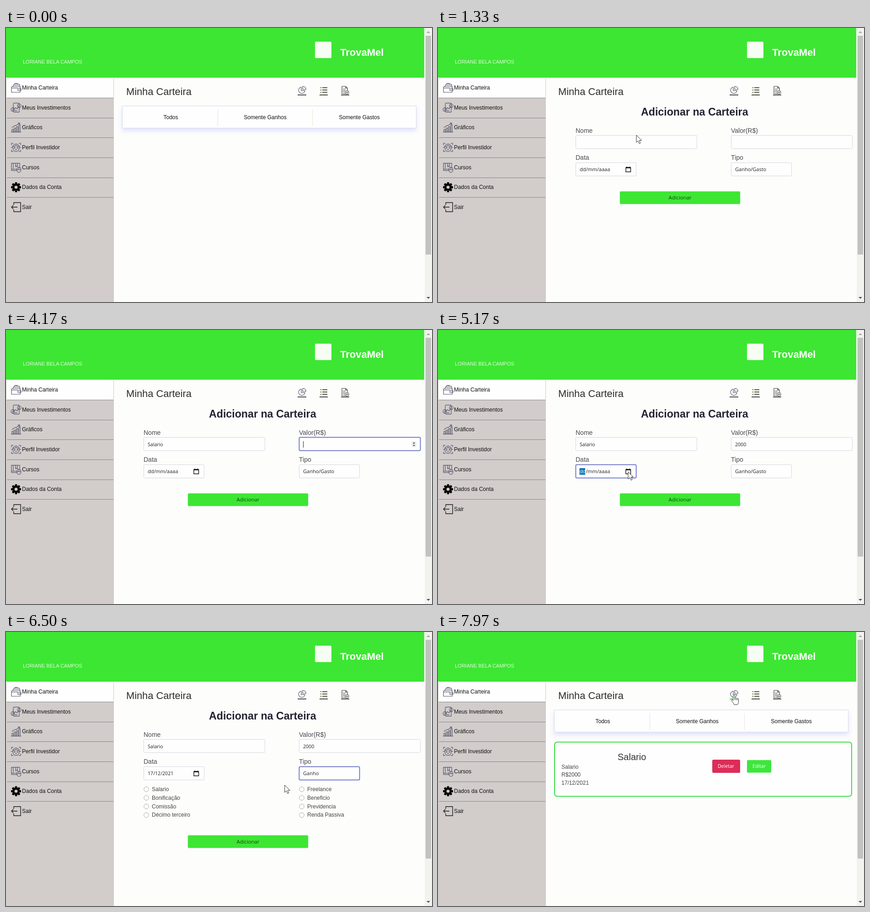
Animation, 932 px wide and 601 px high, one loop 8000 ms. Source, as an HTML page:

```html
<!DOCTYPE html>
<html lang="pt-BR">
<head>
<meta charset="utf-8">
<title>Minha Carteira</title>
<style>
html, body { margin: 0; width: 100%; height: 100%; overflow: hidden; background: #fdfdfc; }
svg { display: block; width: 100%; height: 100%; }
text { font: 12px "Liberation Sans", Arial, sans-serif; fill: #111; white-space: pre; }
.ui { font-family: "Open Sans", "Noto Sans", sans-serif; font-size: 11px; fill: #222; }
.small { font-size: 10.6px; }
.label { font-size: 14px; fill: #484850; }
.soft { fill: #444; }
.mid { text-anchor: middle; }
.icon { fill: none; stroke: #55556a; stroke-width: 1.2; stroke-linejoin: round; }
.box { fill: #fefefe; stroke: #d6d6e0; }
</style>
</head>
<body>
<svg id="stage" viewBox="0 0 932 601" preserveAspectRatio="none"></svg>
<script>
const LOOP = 8000;
const GREEN = '#3de633';
const SIDE = '#d2cccb';
const stage = document.getElementById('stage');
const $ = id => document.getElementById(id);

const rect = (x, y, w, h, attrs = '') =>
  `<rect x="${x}" y="${y}" width="${w}" height="${h}" ${attrs}/>`;
const text = (x, y, str, cls = '', attrs = '') =>
  `<text x="${x}" y="${y}" class="${cls}" ${attrs}>${str}</text>`;
const path = (d, attrs = '') => `<path d="${d}" ${attrs}/>`;
const group = (id, body, attrs = '') => `<g id="${id}" ${attrs}>${body}</g>`;
const input = (id, x, y, w) => rect(x + .5, y + .5, w, 29, `id="${id}" class="box" rx="2"`);

// Sidebar icons, each inside a 22 x 22 box
const gear = () => {
  const teeth = [...Array(8).keys()].map(i =>
    rect(8.6, 0, 4.8, 6, `rx="1" transform="rotate(${i * 45} 11 11)"`)).join('');
  return `<g fill="#080808" stroke="none">${teeth}</g>
    <circle cx="11" cy="11" r="5.8" stroke="#080808" stroke-width="5"/>`;
};
const menu = [
  ['Minha Carteira', path('M1 9h19v12H1zM3 9 7 3h11l2 6M5 6h13M7 3l4-2 5 2M15 13h7v4h-7zM1 12h14')],
  ['Meus Investimentos', rect(5, 1, 13, 20, 'rx="2"') +
    path('M6 15l4-4 3 3 5-7M8 18h6') +
    '<circle cx="4" cy="15" r="4"/><circle cx="18" cy="7" r="4"/>' +
    path('M4 13v4M18 5v4')],
  ['Gráficos', path('M2 21v-6h3v6M7 21v-9h3v9M12 21V9h3v12M17 21V5h3v16M0 21h22M2 11l6-4 4-1 7-5M15 1h4v4')],
  ['Perfil Investidor', path('M1 6V2h4M17 2h4v4M1 16v4h4M17 20h4v-4M0 11h4M18 11h4M4 8q7-9 14 0v5q-2 7-7 7t-7-7zM4 9q5 0 7-3 2 3 7 3M9 16h4') +
    '<circle cx="8" cy="12" r="1"/><circle cx="14" cy="12" r="1"/>'],
  ['Cursos', path('M1 2h18v16H1zM5 2v12M1 15h14M10 2v8l2-2 2 2V2') +
    rect(13, 11, 8.5, 11, `rx="4" fill="${SIDE}"`) + path('M13 16h8.5M17.2 11v5')],
  ['Dados da Conta', gear()],
  ['Sair', path('M6 6V1h15v20H6v-5M1 11h13M5 7l-4 4 4 4', 'stroke="#333" stroke-width="1.6"')]
];
const sidebar = menu.map(([label, art], i) => {
  const cy = 131 + i * 43.65;
  const line = i < 6 ? rect(2, Math.round(cy + 22), 233, 1, 'fill="#85858c"') : '';
  return `<g class="icon" transform="translate(11 ${cy - 11})">${art}</g>` +
    text(35, Math.round(cy + 4), label) + line;
}).join('');

const toolbar = `<g class="icon">
  ${path('M646 129.5a7 7 0 1 0 8 8h-8zM649 128v7h7q0-7-7-7')}
  ${path('M692 131h11M692 136h11M692 141h11M688 131h2M688 136h2M688 141h2', 'stroke="#55553e" stroke-width="1.8"')}
  ${path('M745 144h-10v-16h8l4 4v5M743 128v4h4M737 134h6M737 137h5M737 140h4', 'stroke="#44443c"')}
  <circle cx="746" cy="141" r="4" fill="#fdfdfd" stroke="#44443c"/>
  ${path('M744 141h4M746 139v4', 'stroke="#44443c"')}</g>` +
  rect(638, 146, 19, 1.6, 'id="pieLine" fill="#222"') +
  rect(686, 146, 18, 1.6, 'fill="#222"') + rect(733, 146, 18, 1.6, 'fill="#222"');

const tabs = rect(254.5, 171, 643, 48.5, 'fill="#fefefe" stroke="#dadaec" filter="url(#shade)"') +
  rect(463, 178, 1, 37, 'fill="#e2e2ee"') + rect(670, 178, 1, 37, 'fill="#e8e8d8"') +
  [[360.5, 'Todos'], [567, 'Somente Ganhos'], [773, 'Somente Gastos']]
    .map(([x, s]) => text(x, 200, s, 'mid')).join('');

const card = rect(255, 241.5, 650, 119, 'rx="6" fill="#fefefe" stroke="#3ade44" stroke-width="2"') +
  text(393, 281, 'Salario', '', 'style="font-size:20px;fill:#333"') +
  ['Salario', 'R$2000', '17/12/2021'].map((s, i) => text(270, 300 + i * 17.3, s, 'soft')).join('') +
  rect(600, 280, 61, 29, 'rx="3" fill="#dd2c58"') +
  rect(676, 281, 53, 27.5, 'rx="2" fill="#3de63c"') +
  text(630, 298, 'Deletar', 'ui small mid', 'style="fill:#fff"') +
  text(702.5, 298, 'Editar', 'ui small mid', 'style="fill:#fff"');

const kinds = [
  [307, ['Salario', 'Bonificação', 'Comissão', 'Décimo terceiro']],
  [647, ['Freelance', 'Beneficio', 'Previdencia', 'Renda Passiva']]
];
const radios = kinds.map(([x, names]) => names.map((s, i) => {
  const y = 345 + i * 18.8;
  return `<circle cx="${x}" cy="${y}" r="5.3" fill="#fff" stroke="#aaaab0"/>` + text(x + 12, y + 4, s, 'soft');
}).join('')).join('') +
  '<circle id="picked" cx="307" cy="345" r="4.1" fill="#fff" stroke="#1268e8" stroke-width="3.4"/>';

const form = text(444, 192, 'Adicionar na Carteira', '', 'style="font-size:23.2px;font-weight:bold;fill:#222230"') +
  [[301, 230, 'Nome'], [641, 230, 'Valor(R$)'], [301, 289, 'Data'], [641, 289, 'Tipo']]
    .map(([x, y, s]) => text(x, y, s, 'label')).join('') +
  input('name', 301, 235, 265) + input('value', 641, 235, 265) +
  input('date', 301, 295, 132) + input('type', 641, 295, 132) +
  text(310, 255, '', 'ui small', 'id="nameText"') + text(650, 255, '', 'ui small', 'id="valueText"') +
  group('spin', rect(887, 244, 11, 13, 'fill="#eee"') + path('M890 249l2.5-3 2.5 3zM890 252l2.5 3 2.5-3z', 'fill="#444"')) +
  rect(309.5, 303, 12.5, 14.5, 'id="mark" fill="#0b72b8"') +
  text(310, 314, '<tspan id="day"></tspan><tspan id="rest"></tspan>', 'ui', 'id="dateText"') +
  path('M411 306.5h10.5v9H411zM413 304v2M419.5 304v2', 'fill="none" stroke="#111" stroke-width="1.4"') +
  rect(411, 305, 10.5, 2.5, 'fill="#111"') +
  text(650, 314, '', 'ui', 'id="typeText"') +
  rect(0, 244, 1, 14, 'id="caret" fill="#222"') +
  group('radios', radios) +
  group('add', rect(398, 358.5, 263, 27.5, `id="addBox" rx="2" fill="${GREEN}"`) +
    text(529.5, 376, 'Adicionar', 'ui mid', 'style="font-size:11.3px;fill:#174017"'));

const pointer = group('cursor',
  group('arrow', path('M0 0v16l3.7-3.5 2.5 6 2.7-1.1-2.5-5.9h5z', 'fill="#fff" stroke="#333"')) +
  group('hand', path('M-1.7 12V2q0-2 1.7-2t1.7 2v6q1.5-1.2 3 .3 1.7-1 2.8.5 2.5-.6 2.5 2v5q0 4-2.5 6.5h-7q-1.5-3.5-5.5-8-1.2-2 .2-2.7 1.5-.7 3.1 1.7z',
    'fill="#fff" stroke="#333"') + path('M1.7 8v4M4.7 9v3.5M7.5 10v3', 'stroke="#333"')) +
  group('beam', path('M-3-8q3 0 3 2 0-2 3-2M0-6V6M-3 8q3 0 3-2 0 2 3 2', 'fill="none" stroke="#333"')));

stage.innerHTML = `<defs>
  <filter id="shade" x="-5%" y="-40%" width="110%" height="200%">
    <feDropShadow dx="0" dy="6" stdDeviation="5" flood-color="#8c8cff" flood-opacity=".24"/></filter>
  <filter id="glow" x="-5%" y="-30%" width="110%" height="160%">
    <feDropShadow dx="0" dy="0" stdDeviation=".8" flood-color="#8c98f0" flood-opacity=".4"/></filter></defs>` +
  rect(0, 0, 932, 601, 'fill="#fdfdfc"') +
  rect(0, 110, 236, 491, `fill="${SIDE}"`) + rect(1, 110, 234, 43, 'fill="#fefefe"') +
  rect(0, 0, 915, 109, `fill="${GREEN}"`) +
  text(37, 78, 'LORIANE BELA CAMPOS', '', 'style="font-size:11px;fill:#dff8da"') +
  rect(676, 30, 36, 36, 'rx="2" fill="#f6fdf2"') +
  text(731, 61, 'TrovaMel', '', 'style="font-size:22px;font-weight:bold;fill:#fff"') +
  sidebar + text(263, 147, 'Minha Carteira', '', 'style="font-size:21.8px;fill:#2c2c2c"') + toolbar +
  rect(916, 0, 16, 601, 'fill="#f2f2ee"') + rect(918, 17, 12, 480, 'fill="#c2c2c0"') +
  path('M920 11l4-4 4 4z', 'fill="#a5a5a5"') + path('M920 590l4 4 4-4z', 'fill="#505050"') +
  group('list', tabs) + group('card', card) + group('form', form) + pointer;

// Pointer path: time, x, y, shape from then on
const moves = [
  [0, 770, 260, ''], [250, 770, 260, 'arrow'], [600, 742, 139, 'hand'], [950, 742, 139, 'arrow'],
  [1330, 434, 235, 'arrow'], [1480, 420, 250, 'beam'], [1800, 420, 250, ''],
  [4850, 480, 360, 'arrow'], [5150, 416, 311, 'arrow'], [5300, 416, 311, 'arrow'],
  [5550, 372, 336, 'arrow'], [5870, 653, 324, 'arrow'], [6050, 665, 312, 'arrow'],
  [6250, 668, 334, 'arrow'], [6450, 668, 334, 'arrow'], [6650, 308, 345, 'arrow'],
  [6850, 308, 345, 'arrow'], [7080, 460, 452, 'hand'], [7200, 479.5, 462, 'hand'],
  [7310, 479.5, 462, 'hand'], [7450, 510, 430, 'arrow'], [7880, 647.5, 137, 'hand'], [8000, 647.5, 137, 'hand']
];
const nameSteps = [[2080, 'S'], [2260, 'Sa'], [2440, 'Saa'], [2720, 'Sa'], [2880, 'Sal'],
  [3030, 'Sala'], [3180, 'Salar'], [3330, 'Salari'], [3480, 'Salario']];
const valueSteps = [[4400, '2'], [4540, '20'], [4660, '200'], [4780, '2000']];
const focusSteps = [[0, ''], [1560, 'name'], [3900, 'value'], [5150, 'date'], [6050, 'type'], [6720, '']];

const at = (steps, t) => steps.reduce((v, [start, s]) => t >= start ? s : v, '');
const ease = p => p * p * (3 - 2 * p);
const show = (id, on) => $(id).setAttribute('display', on ? 'inline' : 'none');

function movePointer(t) {
  const i = moves.findIndex((m, k) => k === moves.length - 1 || t < moves[k + 1][0]);
  const a = moves[i], b = moves[i + 1] || a;
  const p = a === b ? 0 : ease((t - a[0]) / (b[0] - a[0]));
  const x = a[1] + (b[1] - a[1]) * p, y = a[2] + (b[2] - a[2]) * p;
  $('cursor').setAttribute('transform', `translate(${x} ${y})`);
  for (const shape of ['arrow', 'hand', 'beam']) show(shape, a[3] === shape);
}

function draw(t) {
  const inForm = t >= 900 && t < 7700;
  const focus = at(focusSteps, t);
  const dated = t >= 5550, gain = t >= 6450, pressed = t >= 7200;
  show('form', inForm);
  show('list', !inForm);
  show('card', t >= 7700);
  for (const id of ['name', 'value', 'date', 'type']) {
    const on = focus === id, el = $(id);
    el.style.stroke = on ? '#5862b8' : id === 'type' && t >= 5840 && t < 6050 ? '#9292a0' : '';
    el.style.strokeWidth = on ? 1.5 : 1;
    el.setAttribute('filter', on ? 'url(#glow)' : 'none');
  }
  $('nameText').textContent = at(nameSteps, t);
  $('valueText').textContent = at(valueSteps, t);
  $('day').textContent = dated ? '17' : 'dd';
  $('rest').textContent = dated ? '/12/2021' : '/mm/aaaa';
  $('day').style.fill = focus === 'date' ? '#fff' : '';
  $('dateText').style.fontSize = dated ? '10.6px' : '11px';
  $('typeText').textContent = gain ? 'Ganho' : 'Ganho/Gasto';
  show('mark', focus === 'date');
  show('spin', focus === 'value');

  const [field, x, since] = focus === 'name'
    ? ['nameText', 310, t >= 2080 ? 2080 : 1560] : ['valueText', 650, 3900];
  const blink = (t - since) % 1000 < 440;
  show('caret', (focus === 'name' || focus === 'value') && blink);
  $('caret').setAttribute('x', x + (inForm ? $(field).getComputedTextLength() : 0));

  show('radios', gain);
  show('picked', t >= 6720);
  $('add').setAttribute('transform', `translate(0 ${gain ? 87.5 : 0})`);
  $('addBox').style.stroke = pressed ? '#3a8c6a' : '#7fdc90';
  $('addBox').style.strokeWidth = pressed ? 1.8 : .6;
  $('pieLine').setAttribute('fill', t >= 7880 ? '#35d23c' : '#222');
  movePointer(t);
}

function tick(now) {
  draw(now % LOOP);
  requestAnimationFrame(tick);
}
draw(0);
requestAnimationFrame(tick);
</script>
</body>
</html>
```
